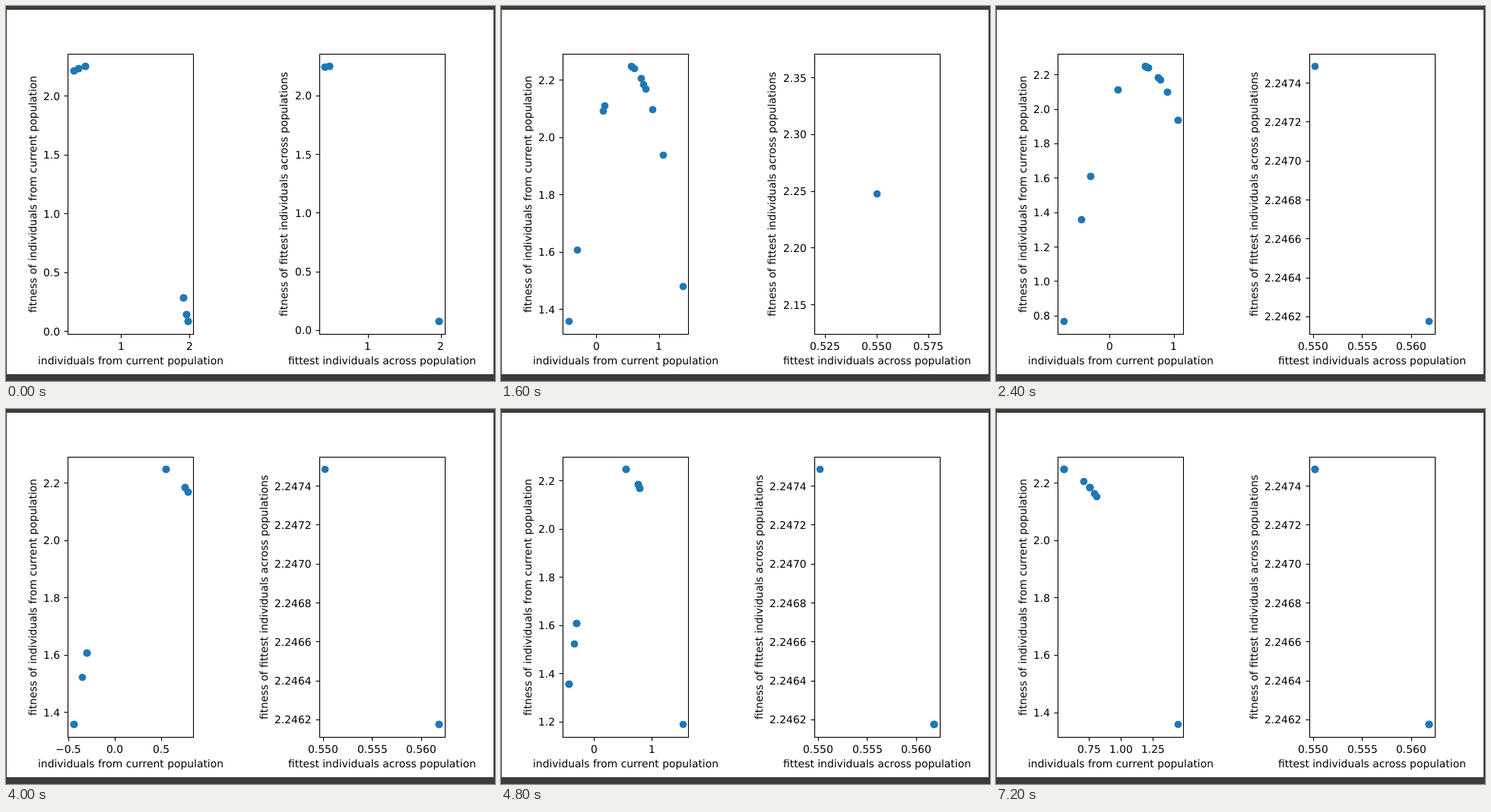
An HTML page with a canvas for the animation above (8 s loop, 643 px wide and 494 px high).

```html
<!DOCTYPE html>
<html lang="en">
<head>
<meta charset="utf-8">
<title>Population fitness</title>
<style>
html, body { margin: 0; width: 100%; height: 100%; overflow: hidden; background: #3c3c3c; }
canvas { display: block; }
</style>
</head>
<body>
<canvas id="stage" width="643" height="494"></canvas>
<script>
const ctx = document.getElementById('stage').getContext('2d');
const STEP_MS = 800, GENERATIONS = 10;
const TOP = 62.6, BOTTOM = 432.2;
const WIDTH = 496 / 3, LEFT = 81, RIGHT = LEFT + 2 * WIDTH;

const fitness = x => 2 + x - x * x;
const BEST = .55015, SECOND = .56185;

// Individuals sharing a lifespan: first and last generation, then their values.
const cohorts = [
  [-4, 0, .31, .378, .478, 1.902, 1.95, 1.9716],
  [1, 1, -.937, -.411, .02, .08, .316, .82, 1.168, 1.771],
  [1, 2, .102, .71, 1.3777],
  [1, 3, .128, SECOND, .598, 1.059],
  [1, 4, .89],
  [1, 7, -.301],
  [1, 8, -.445],
  [1, 9, BEST, .755],
  [2, 7, .784],
  [3, 4, -.718],
  [5, 6, -.353],
  [6, 7, 1.5305],
  [8, 9, .708, .792, .81],
  [9, 9, 1.4445]
];

// Long-lived individuals gain copies, which overlap.
function population(generation) {
  return cohorts.flatMap(([born, died, ...values]) => {
    if (generation < born || generation > died) return [];
    const copies = 1 + Math.floor((generation - born) / 2);
    return Array(copies).fill(values).flat();
  });
}

function fittest(generation) {
  if (!generation) return Array(3).fill([.412, .47, 1.975]).flat();
  return Array.from({ length: generation - 1 }, (_, i) => i > 0 && i < 5 ? SECOND : BEST);
}

const snap = v => Math.round(v) + .5;

function limits(values) {
  if (!values.length) return [-.055, .055];
  let lo = Math.min(...values), hi = Math.max(...values);
  if (lo === hi) { const d = .05 * lo; lo -= d; hi += d; }
  const margin = .05 * (hi - lo);
  return [lo - margin, hi + margin];
}

const niceSteps = [];
for (let e = -5; e < 1; e++)
  for (const m of [1, 2, 2.5, 5]) niceSteps.push(+(m * 10 ** e).toPrecision(3));

function ticks([lo, hi], bins) {
  let i = niceSteps.findIndex(s => s >= (hi - lo) / bins), first, last;
  for (;; i--) {
    first = Math.ceil(lo / niceSteps[i]);
    last = Math.floor(hi / niceSteps[i]);
    if (last > first) break;
  }
  const step = niceSteps[i];
  let digits = 0;
  while (Math.abs(step * 10 ** digits - Math.round(step * 10 ** digits)) > 1e-6) digits++;
  return Array.from({ length: last - first + 1 }, (_, k) => {
    const value = (first + k) * step;
    return { value, label: (value < 0 ? '\u2212' : '') + Math.abs(value).toFixed(digits) };
  });
}

function line(x1, y1, x2, y2) {
  ctx.beginPath();
  ctx.moveTo(x1, y1);
  ctx.lineTo(x2, y2);
  ctx.stroke();
}

// Places text on whole pixels; shift is the share of its width left of x.
function text(s, x, y, shift) {
  const width = ctx.measureText(s).width;
  ctx.fillText(s, Math.round(x - shift * width), Math.round(y));
  return width;
}

function plot(left, xs, xTitle, yTitle) {
  const ys = xs.map(fitness), xLim = limits(xs), yLim = limits(ys);
  const px = v => left + (v - xLim[0]) / (xLim[1] - xLim[0]) * WIDTH;
  const py = v => BOTTOM - (v - yLim[0]) / (yLim[1] - yLim[0]) * (BOTTOM - TOP);
  const x0 = snap(left), y0 = snap(BOTTOM), y1 = snap(TOP);

  ctx.fillStyle = '#1f77b4';
  xs.forEach((x, i) => {
    ctx.beginPath();
    ctx.arc(snap(px(x)), snap(py(ys[i])), 4.86, 0, 2 * Math.PI);
    ctx.fill();
  });

  ctx.fillStyle = ctx.strokeStyle = '#000';
  ctx.strokeRect(x0, y1, snap(left + WIDTH) - x0, y0 - y1);

  for (const { value, label } of ticks(xLim, 3)) {
    const x = px(value);
    line(snap(x), y0, snap(x), y0 + 5);
    text(label, x, BOTTOM + 20.7, .5);
  }
  let labelWidth = 0;
  for (const { value, label } of ticks(yLim, 9)) {
    const y = py(value);
    line(x0 - 5, snap(y), x0, snap(y));
    labelWidth = Math.max(labelWidth, text(label, left - 9.7, y + 5.5, 1));
  }

  text(xTitle, left + WIDTH / 2, BOTTOM + 40, .5);
  ctx.save();
  ctx.translate(Math.round(left - 19.3 - labelWidth), 248);
  ctx.rotate(-Math.PI / 2);
  text(yTitle, 0, 0, .5);
  ctx.restore();
}

function draw(generation) {
  ctx.fillStyle = '#3c3c3c';
  ctx.fillRect(0, 0, 643, 494);
  ctx.fillStyle = '#fff';
  ctx.fillRect(1, 5, 640, 480);
  ctx.lineWidth = 1.11;
  ctx.font = '13.89px "DejaVu Sans", sans-serif';
  ctx.textRendering = 'geometricPrecision';
  plot(LEFT, population(generation),
    'individuals from current population', 'fitness of individuals from current population');
  plot(RIGHT, fittest(generation),
    'fittest individuals across population', 'fitness of fittest individuals across populations');
}

function frame() {
  draw(Math.floor(performance.now() / STEP_MS) % GENERATIONS);
  requestAnimationFrame(frame);
}
frame();
</script>
</body>
</html>
```
